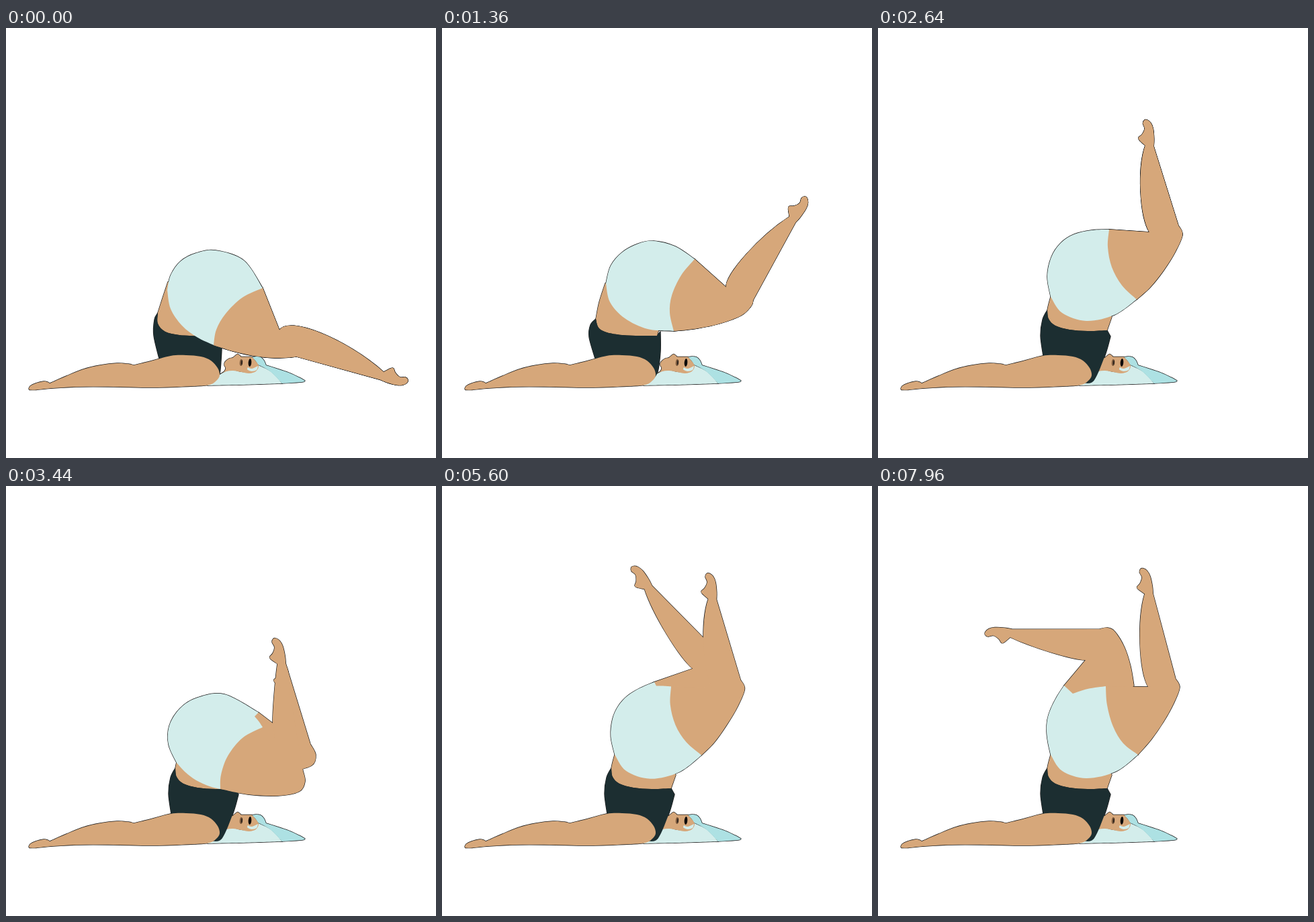
An HTML page with a canvas that plays this animation: 640 px wide and 640 px high, repeating every 8000 ms.

```html
<!DOCTYPE html>
<html lang="en">
<head>
<meta charset="utf-8">
<title>Leg stretch</title>
<style>
html, body { margin: 0; width: 100%; height: 100%; overflow: hidden; background: #fff; }
canvas { display: block; }
</style>
</head>
<body>
<canvas id="stage" width="640" height="640"></canvas>
<script>
const ctx = document.getElementById('stage').getContext('2d');
const LOOP = 8000;
const HIP = [315, 370];
const SKIN = '#d6a77a', PALE = '#d3edeb', TEAL = '#ade1e3', DARK = '#1c2e31', EDGE = '#1a1a1a';

const parse = s => s.trim().split(/\s+/).map(p => p.split(',').map(Number));

// A track stores every point as angle and radius around the hip.
function track(...keys) {
  let prev = null;
  return keys.map(([time, text]) => {
    const values = parse(text).flatMap(([x, y], i) => {
      let a = Math.atan2(y - HIP[1], x - HIP[0]);
      if (prev) a -= 2 * Math.PI * Math.round((a - prev[2 * i]) / (2 * Math.PI));
      return [a, Math.hypot(x - HIP[0], y - HIP[1])];
    });
    prev = values;
    return { time, values };
  });
}

function sample(keys, t) {
  const last = keys.length - 1;
  let i = 0;
  while (i < last - 1 && t >= keys[i + 1].time) i++;
  const span = keys[i + 1].time - keys[i].time;
  const u = Math.min(1, (t - keys[i].time) / span);
  const slope = (k, j) => (keys[k + 1].values[j] - keys[k].values[j]) / (keys[k + 1].time - keys[k].time);
  const tangent = (k, j) => {
    if (k === 0) return slope(0, j);
    if (k === last) return slope(last - 1, j);
    const a = slope(k - 1, j), b = slope(k, j);
    return a * b <= 0 ? 0 : 2 * a * b / (a + b);
  };
  const v = keys[i].values.map((from, j) => {
    const to = keys[i + 1].values[j];
    return from + (to - from) * u * u * (3 - 2 * u)
      + span * u * (1 - u) * ((1 - u) * tangent(i, j) - u * tangent(i + 1, j));
  });
  const pts = [];
  for (let j = 0; j < v.length; j += 2) {
    pts.push([HIP[0] + v[j + 1] * Math.cos(v[j]), HIP[1] + v[j + 1] * Math.sin(v[j])]);
  }
  return pts;
}

// Shorts: back edge (7), rear leg opening (2), front opening (5), waist (3)
const seatUp = '257,400 252,370 258,341 272,320 292,307 318,301 344,300 344,300 344,300 344,300 342,326 348,356 363,383 385,404 352,427 310,436 274,424';
const seatOpen = '257,398 250,381 246,365 245,352 244,342 244,332 245,322 268,326 290,307 333,295 334,325 346,355 365,377 389,392 355,423 310,435 274,424';
const seat = track(
  [0, '240,390 245,368 260,347 283,335 312,331 354,346 382,387 382,387 382,387 382,387 352,401 327,425 313,449 309,472 284,460 262,443 245,418'],
  [1360, '244,380 251,354 268,334 292,321 315,317 347,325 376,344 376,344 376,344 376,344 356,368 342,398 339,424 345,451 306,448 272,432 250,408'],
  [2640, seatUp],
  [3440, '254,412 242,385 243,357 259,331 285,315 325,310 376,337 370,343 376,350 382,359 352,375 330,402 320,430 319,451 303,447 283,438 267,426'],
  [4560, '257,398 252,380 249,362 250,343 253,329 257,316 262,305 280,314 304,302 335,296 336,325 347,355 365,377 389,393 355,423 310,435 274,424'],
  [5060, seatOpen], [5890, seatUp], [6680, seatOpen], [7520, seatUp],
  [7960, '257,400 253,382 251,365 252,348 257,332 266,314 277,297 290,309 312,302 339,298 341,326 350,358 365,383 387,400 354,425 310,435 274,424'],
  [8380, seatOpen]
);

// Thighs: knee crease, two kneecap points, front of the thigh (4)
const thighDown = '407,450 432,489 424,490 400,491 370,488 338,481 309,472';
const thighMid = '423,386 463,405 460,414 445,428 413,440 380,447 345,451';
const thighUp = '404,304 447,294 453,308 442,334 425,361 405,386 385,404';
const nearOpen = '397,291 437,276 443,288 434,314 419,344 405,371 389,392';
const farOpen = '257,262 253,218 263,215 276,219 303,237 331,265 353,292';
const nearThigh = track(
  [0, thighDown], [1360, thighMid], [2640, thighUp],
  [3440, '400,375 442,424 445,440 436,455 405,461 360,459 319,451'],
  [4560, '398,293 438,278 444,290 434,316 420,344 405,372 389,393'],
  [5060, nearOpen], [5890, thighUp], [6680, nearOpen], [7520, thighUp],
  [7960, '402,299 443,287 449,300 440,324 425,351 407,377 387,400'],
  [8380, nearOpen]
);
const farThigh = track(
  [0, thighDown], [1360, thighMid], [2640, thighUp],
  [3440, '397,353 453,384 461,400 455,416 425,425 385,435 340,440'],
  [4560, '286,263 293,213 308,208 320,212 340,235 356,263 369,293'],
  [5060, farOpen], [5890, thighUp], [6680, farOpen], [7520, thighUp],
  [7960, '309,259 330,213 342,211 353,217 367,240 376,268 381,297'],
  [8380, farOpen]
);

// Shins: ankle, toe, calf
const rise = [
  [0, '560,518 593,525 468,454'],
  [840, '553,388 584,370 475,384'],
  [1360, '522,285 542,252 453,337'],
  [1700, '485,227 497,188 442,290']
];
const shinUp = '404,175 398,131 391,243';
const shinOpen = '397,150 388,112 384,225';
const farShinUp = '388,165 377,122 388,238';
const farShinOpen = '124,252 83,258 202,270';
const nearShin = track(...rise,
  [2640, shinUp],
  [3440, '415,300 409,264 400,335'],
  [4560, '396,153 387,115 385,227'],
  [5060, shinOpen], [5890, shinUp], [6680, shinOpen], [7520, shinUp],
  [7960, '403,160 393,123 390,235'],
  [8380, shinOpen]
);
const farShin = track(...rise,
  [2640, shinUp],
  [3440, '410,264 400,228 399,312'],
  [4200, '272,196 243,176 306,241'],
  [4560, '172,253 133,260 232,266'],
  [5060, farShinOpen], [5890, farShinUp], [6680, farShinOpen], [7520, farShinUp],
  [7960, '198,219 159,219 259,248'],
  [8380, farShinOpen]
);

// Torso: side (2), hem of the top (6), right flank (1), right edge (4), left edge (3)
const torsoUp = '257,400 254,411 252,420 254,433 264,443 285,449 312,451 341,450 348,430 346,459 338,487 322,524 308,529 246,488 242,458 245,434';
const torso = track(
  [0, '241,378 233,402 226,424 226,440 237,452 258,457 290,460 321,473 321,465 321,478 320,495 318,514 312,522 228,492 220,458 221,434'],
  [1360, '243,380 234,408 229,433 233,446 245,453 268,457 295,458 320,458 323,448 325,452 325,482 321,512 314,523 228,492 219,460 221,442'],
  [2640, torsoUp], [LOOP, torsoUp]
);

const FOOT = parse('1,6 10,13.5 14,14.3 18,8.5 26,3.5 34,5 38.5,2 38,-2 33,-6.5 24,-8.7 9,-8 -2,-6');

// Catmull-Rom run through the points, joined to the path by a corner
function run(path, pts) {
  path.lineTo(...pts[0]);
  for (let i = 0; i < pts.length - 1; i++) {
    const a = pts[i - 1] || pts[i], b = pts[i], c = pts[i + 1], d = pts[i + 2] || c;
    path.bezierCurveTo(
      b[0] + (c[0] - a[0]) / 6, b[1] + (c[1] - a[1]) / 6,
      c[0] - (d[0] - b[0]) / 6, c[1] - (d[1] - b[1]) / 6, c[0], c[1]);
  }
}

function shape(...runs) {
  const path = new Path2D();
  path.moveTo(...runs[0][0]);
  runs.forEach(r => run(path, r));
  path.closePath();
  return path;
}

const outline = text => shape(...text.split('|').map(parse));

function leg(start, [crease, ...front], [ankle, toe, calf]) {
  const angle = Math.atan2(toe[1] - ankle[1], toe[0] - ankle[0]);
  const c = Math.cos(angle), s = Math.sin(angle);
  const foot = FOOT.map(([x, y]) => [ankle[0] + x * c + y * s, ankle[1] + x * s - y * c]);
  const along = k => crease.map((v, i) => v + (foot[0][i] - v) * k);
  const mid = along(0.48);
  const bulge = k => along(k).map((v, i) => v + (calf[i] - mid[i]) * 4 / 3);
  const path = new Path2D();
  path.moveTo(...HIP);
  path.lineTo(...start);
  path.lineTo(...crease);
  path.bezierCurveTo(...bulge(0.2), ...bulge(0.75), ...foot[0]);
  run(path, foot);
  run(path, front);
  path.closePath();
  return path;
}

const arm = outline(`34,537 36,533 44,529 56,526 62,527 65,529 |
  65,529 90,518 115,508 140,502 165,499 182,500 190,502 |
  190,502 215,496 245,488 268,487 290,489 305,495 315,506 318,517 313,525 303,531
  280,533 220,535 160,534 110,534 70,536 45,538.5 35,538.5`);
const hair = outline(`300,531 318,516 335,509 355,512 376,502 | 376,502 395,512 411,529 | 411,529 350,531 300,532`);
const hairBack = outline(`366,490 372,489 379,490 384,495 387,502 | 387,502 418,512 436,520 445,525 |
  445,525 440,527 411,529 | 411,529 393,511 375,501 | 375,501 371,495 366,490`);
const face = outline(`319,515 325,511 327,506 325,502 326,497 332,492 337,491 341,488 345,485.5 350,489.5 |
  350,489.5 366,489.5 | 366,489.5 371,495 376,503 372,511 362,514 350,512 338,510 328,511 319,515`);
const strap = outline(`360,505 366,507 375,503 | 375,503 373,509 366,511 360,509 359,507`);

function ellipse(x, y, rx, ry, color) {
  ctx.fillStyle = color;
  ctx.beginPath();
  ctx.ellipse(x, y, rx, ry, 0.08, 0, 2 * Math.PI);
  ctx.fill();
}

function draw(t) {
  const p = sample(seat, t), b = sample(torso, t);
  const hem = b.slice(2, 8);
  const shorts = shape(p.slice(0, 7), p.slice(7, 10), p.slice(9, 14), [...p.slice(13), p[0]]);
  const waist = shape(b.slice(0, 3), hem, [b[8], HIP]);
  const top = shape(hem, b.slice(9, 13), [...b.slice(13), hem[0]]);
  const parts = [
    [hair, PALE], [hairBack, TEAL], [face, SKIN],
    [waist, SKIN], [top, DARK],
    [leg(p[6], sample(farThigh, t), sample(farShin, t)), SKIN],
    [leg(p[9], sample(nearThigh, t), sample(nearShin, t)), SKIN],
    [shorts, PALE], [arm, SKIN]
  ];

  ctx.fillStyle = '#fff';
  ctx.fillRect(0, 0, 640, 640);
  ctx.strokeStyle = EDGE;
  ctx.lineWidth = 1.4;
  ctx.lineJoin = 'round';
  parts.forEach(([path]) => ctx.stroke(path));
  parts.forEach(([path, color], i) => {
    ctx.fillStyle = color;
    ctx.fill(path);
    if (i === 2) {
      ellipse(350, 498, 2.2, 5, '#7b5a3e');
      ellipse(351, 498, 1, 3.5, '#2b211b');
      ellipse(363, 498, 2.3, 6, '#0d0b0a');
      ctx.fillStyle = PALE;
      ctx.fill(strap);
    }
  });
}

function frame() {
  draw(performance.now() % LOOP);
  requestAnimationFrame(frame);
}
frame();
</script>
</body>
</html>
```
